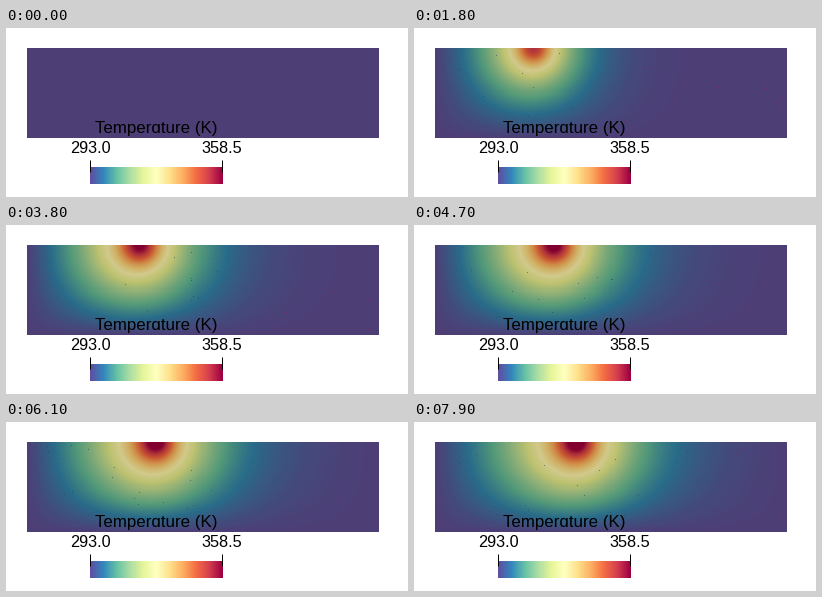
These frames come from a looping animation (402x169 px, 8000 ms). A matplotlib script:

```python
import numpy as np
import matplotlib.pyplot as plt
from matplotlib.animation import FuncAnimation

W, H = 402, 169
X0, Y0, PW, PH = 21, 21, 351, 89        # plate, in pixels
FRAMES, STEP_MS = 80, 100
SUBSTEPS = 10

# Heated plate: cold sides and bottom, a spot of heat sliding along the top
DIFF, SIGMA, GAIN = 1200.0, 8.5, 0.22
START, SPEED = 86.7, 7.0                # px and px/s
SHADE = np.array([0.82, 0.79, 0.73])
CMAP = plt.get_cmap("Spectral_r")

kx = np.arange(1, 101) * np.pi / PW
ky = (np.arange(26) + 0.5) * np.pi / PH
basis_x = np.sin(np.outer(np.arange(PW) + 0.5, kx))
basis_y = np.cos(np.outer(ky, np.arange(PH) + 0.5))
k2 = kx[:, None] ** 2 + ky[None, :] ** 2
spot = 4 / (PW * PH) * np.exp(-k2 * SIGMA ** 2 / 2) * 2 * np.pi * DIFF * GAIN


def solve():
    """Temperature (0..1) on the plate for every frame."""
    dt = STEP_MS / 1000 / SUBSTEPS
    decay = np.exp(-DIFF * k2 * dt)
    feed = spot * (1 - decay) / (DIFF * k2)
    modes = np.zeros_like(k2)
    fields = []
    for n in range(FRAMES):
        fields.append((basis_x @ modes @ basis_y).T)
        for s in range(SUBSTEPS):
            x = START + SPEED * (n * SUBSTEPS + s + 0.5) * dt
            modes = modes * decay + feed * np.sin(kx * x)[:, None]
    return fields


fields = solve()

# Mesh nodes that flicker: magenta in the cold part, dark in the warm part
rng = np.random.default_rng(12)
NODES = 420
node_x = rng.integers(2, PW - 2, NODES)
node_y = rng.integers(2, PH - 2, NODES)
MAGENTA = np.array([140, 20, 80]) / 255
DARK = np.array([35, 62, 98]) / 255


def plate_image(n):
    temp = fields[n]
    rgb = CMAP(np.clip(temp, 0, 1))[..., :3] * SHADE
    if n == 0:
        return rgb
    lit = np.random.default_rng(500 + n).random(NODES)
    value = temp[node_y, node_x]
    cold = (value < 0.025) & (node_x > 150) & (lit < 0.07)
    warm = (value > 0.04) & (value < 0.5) & (lit < 0.09)
    for mask, color, mix in ((cold, MAGENTA, 0.6), (warm, DARK, 0.55)):
        r, c = node_y[mask], node_x[mask]
        rgb[r, c] = rgb[r, c] * (1 - mix) + color * mix
    return rgb


DPI = 100
# The small margin keeps the pixel size from rounding down
fig = plt.figure(figsize=((W + 0.001) / DPI, (H + 0.001) / DPI), dpi=DPI,
                 facecolor="white")
ax = fig.add_axes([0, 0, 1, 1])
ax.axis("off")

plate = ax.imshow(plate_image(0), extent=(X0, X0 + PW, Y0 + PH, Y0),
                  interpolation="nearest", aspect="auto")
ax.imshow(np.linspace(0, 1, 132)[None, :], cmap=CMAP, extent=(84, 216, 156, 140),
          interpolation="nearest", aspect="auto")
for x in (83.5, 215.5):
    ax.plot([x, x], [132, 144], color="black", lw=0.72, solid_capstyle="butt")


def label(x, y, text, px):
    ax.text(x, y, text, family="Liberation Sans", fontsize=px * 0.72,
            ha="center", va="baseline", color="black")


label(150, 105, "Temperɑture (K)", 16.9)
label(84, 125, "293.0", 16.3)
label(216, 125, "358.5", 16.3)
ax.set_xlim(0, W)
ax.set_ylim(H, 0)


def update(n):
    plate.set_data(plate_image(n))
    return (plate,)


anim = FuncAnimation(fig, update, frames=FRAMES, interval=STEP_MS,
                     repeat=True, repeat_delay=0, blit=False)
plt.show()
```
